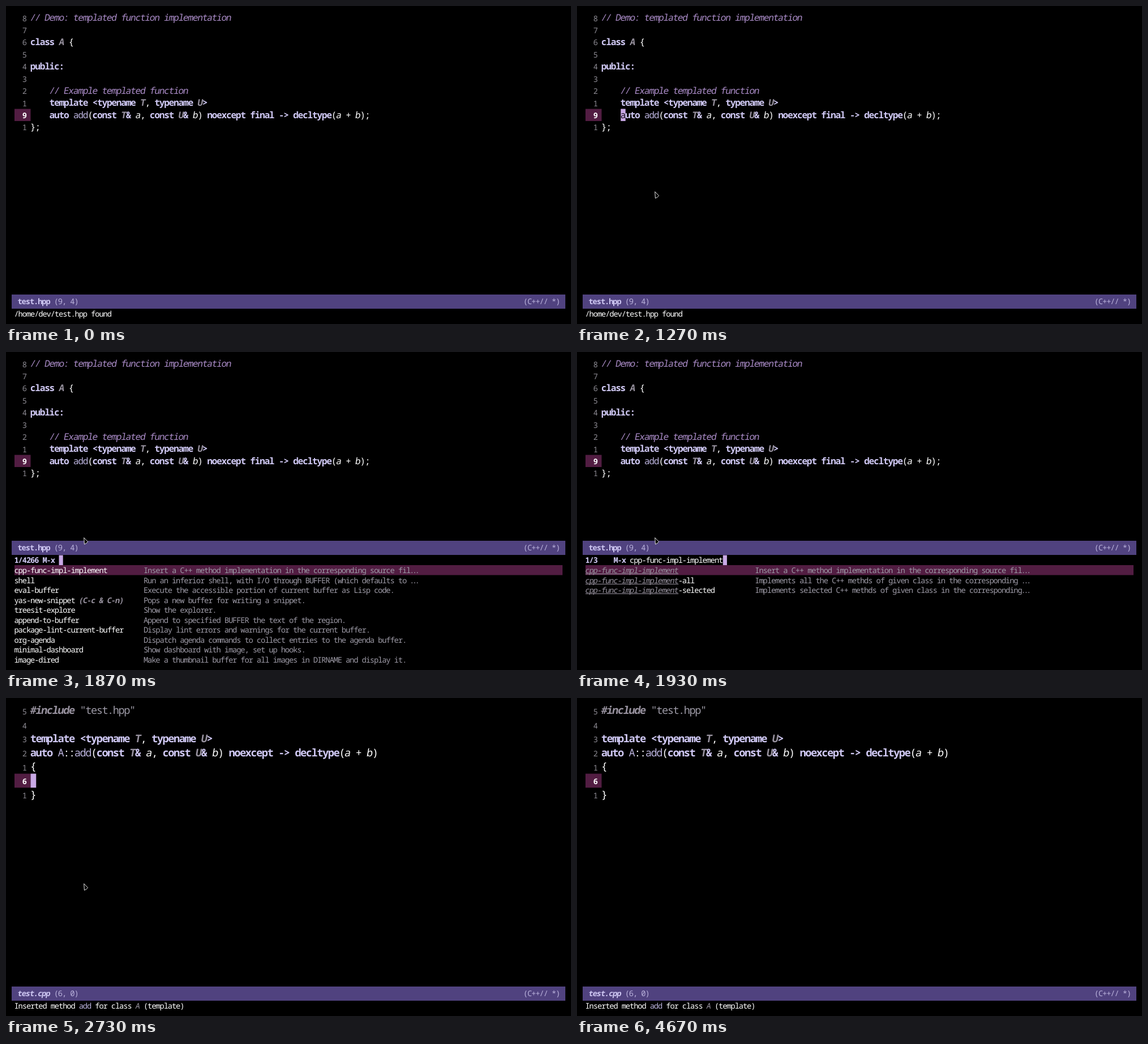
Animation of 998 by 561 pixels, one loop 4.94 s. Source, as an HTML page with a canvas:

```html
<!DOCTYPE html>
<html lang="en">
<head>
<meta charset="utf-8">
<style>
  html, body { margin: 0; width: 100%; height: 100%; overflow: hidden; background: #000; }
  canvas { display: block; }
</style>
</head>
<body>
<canvas id="stage" width="998" height="561"></canvas>
<script>
const ctx = document.getElementById("stage").getContext("2d");
const LOOP = 4940;
const SHOW = 70, PROMPT = 1330, COMPLETE = 1930, INSERT = 2730, HIDE = 4600;

const FACE = '"Noto Sans Mono", "DejaVu Sans Mono", monospace';
const SMALL = 7.14, LEFT = 15, CODE_X = 43.5, ROW = 17.55;
const SLANT = 0.17;
const BAR = "#50427f", MARK = "#521d42", CURSOR = "#c9a9e6";

// Styles: [weight, colour, slant]
const STYLES = {
  w: [400, "#ffffff", 0],
  k: [600, "#cfc8f3", 0],
  t: [600, "#98929f", SLANT],
  i: [400, "#98929f", SLANT],
  v: [400, "#ffffff", SLANT],
  c: [400, "#ab8cc8", SLANT],
  f: [400, "#bab2dc", 0],
  s: [400, "#9d9aa6", 0],
  n: [400, "#8c8a92", 0],
  b: [600, "#ffffff", 0],
  m: [600, "#cfc8f3", SLANT],
  d: [400, "#100818", 0]
};

// "~x" switches to style x for the text that follows.
const HEADER = [
  "~c// Demo: templated function implementation",
  "",
  "~kclass ~tA ~w{",
  "",
  "~kpublic:",
  "",
  "~c    // Example templated function",
  "~k    template <typename ~tT~w, ~ktypename ~tU~k>",
  "~k    auto ~fadd~w(~kconst ~tT~k& ~va~w, ~kconst ~tU~k& ~vb~w) ~knoexcept final -> decltype~w(~va ~w+ ~vb~w);",
  "~w};"
];
const SOURCE = [
  '~t#include ~s"test.hpp"',
  "",
  "~ktemplate <typename ~tT~w, ~ktypename ~tU~k>",
  "~kauto ~fA~w::~fadd~w(~kconst ~tT~k& ~va~w, ~kconst ~tU~k& ~vb~w) ~knoexcept -> decltype~w(~va ~w+ ~vb~w)",
  "~w{",
  "",
  "~w}"
];
const COMMANDS = [
  ["~wcpp-func-impl-implement", "Insert a C++ method implementation in the corresponding source fil…"],
  ["~wshell", "Run an inferior shell, with I/O through BUFFER (which defaults to …"],
  ["~weval-buffer", "Execute the accessible portion of current buffer as Lisp code."],
  ["~wyas-new-snippet ~t(C-c & C-n)", "Pops a new buffer for writing a snippet."],
  ["~wtreesit-explore", "Show the explorer."],
  ["~wappend-to-buffer", "Append to specified BUFFER the text of the region."],
  ["~wpackage-lint-current-buffer", "Display lint errors and warnings for the current buffer."],
  ["~worg-agenda", "Dispatch agenda commands to collect entries to the agenda buffer."],
  ["~wminimal-dashboard", "Show dashboard with image, set up hooks."],
  ["~wimage-dired", "Make a thumbnail buffer for all images in DIRNAME and display it."]
];
const TYPED = "cpp-func-impl-implement";
const MATCHES = [
  ["~i" + TYPED, "Insert a C++ method implementation in the corresponding source fil…"],
  ["~i" + TYPED + "~w-all", "Implements all the C++ methds of given class in the corresponding …"],
  ["~i" + TYPED + "~w-selected", "Implements selected C++ methds of given class in the corresponding…"]
];

function rect(x, y, w, h, color) {
  ctx.fillStyle = color;
  ctx.fillRect(x, y, w, h);
}

// Draws one character centred on x; slanted styles lean about mid-height.
function glyph(ch, x, y, slant, size) {
  ctx.setTransform(1, 0, -slant, 1, x - slant * size * 0.3, y);
  ctx.fillText(ch, 0, 0);
}

// Places marked-up text on a monospace grid; an ellipsis is two cells wide.
function write(markup, x, y, cell = SMALL) {
  const size = cell * 1.92;
  const parts = markup.split(/~(.)/);
  let col = 0;
  ctx.save();
  for (let p = 1; p < parts.length; p += 2) {
    const [weight, color, slant] = STYLES[parts[p]];
    ctx.font = `${weight} ${size}px ${FACE}`;
    ctx.fillStyle = color;
    for (const ch of parts[p + 1]) {
      if (ch === "…") {
        for (let dot = 1; dot < 6; dot += 2) glyph(".", x + (col + dot / 3) * cell, y, slant, size);
        col += 2;
      } else {
        if (ch !== " ") glyph(ch, x + (col + 0.5) * cell, y, slant && slant, size);
        col++;
      }
    }
  }
  ctx.restore();
}

function drawCode(lines, current, cell, pitch, drop) {
  lines.forEach((line, i) => {
    const top = 10 + i * pitch;
    const here = i === current;
    if (here) rect(LEFT, top, CODE_X - LEFT, pitch, MARK);
    const number = here ? i + 1 : Math.abs(i - current);
    write((here ? "~b" : "~n") + number, LEFT + 2 * SMALL, top + drop + 0.5);
    write(line, CODE_X, top + drop, cell);
  });
}

function drawBar(y, label) {
  rect(10, y, 978, 25, BAR);
  write(label, 21, y + 17);
  write("~f(C++// *)", 914.3, y + 17);
}

function drawPrompt(prompt, entries, descCol, cursorCol) {
  const first = 372.4;
  drawBar(333, "~ktest.hpp~f (9, 4)");
  write(prompt, LEFT, first);
  rect(LEFT + cursorCol * SMALL, 358.5, SMALL, ROW, CURSOR);
  rect(LEFT, 376, 968, ROW, MARK);
  entries.forEach(([name, desc], i) => {
    const y = first + (i + 1) * ROW;
    write(name, LEFT, y);
    write("~s" + desc, LEFT + descCol * SMALL, y);
    if (name.startsWith("~i")) rect(LEFT, Math.round(y) + 1, TYPED.length * SMALL, 1, STYLES.i[1]);
  });
}

function drawPointer() {
  ctx.beginPath();
  ctx.moveTo(137.7, 327.6);
  ctx.lineTo(144.6, 334.8);
  ctx.lineTo(141.8, 337.4);
  ctx.lineTo(138.4, 339.2);
  ctx.closePath();
  ctx.fillStyle = "#000";
  ctx.fill();
  ctx.strokeStyle = "#e4e4e4";
  ctx.lineWidth = 1;
  ctx.stroke();
}

function draw(t) {
  const active = t >= SHOW && t < HIDE;
  rect(0, 0, 998, 561, "#000");
  if (t < INSERT) {
    const cell = 8.44, pitch = 21.44;
    drawCode(HEADER, 8, cell, pitch, 16);
    if (t < PROMPT) {
      if (active) {
        const x = CODE_X + 4 * cell, y = 10 + 8 * pitch;
        rect(x, y, cell, pitch, CURSOR);
        write("~da", x, y + 16, cell);
      }
      drawBar(509, "~ktest.hpp~f (9, 4)");
      write("~w/home/dev/test.hpp found", LEFT, 548);
    } else if (t < COMPLETE) {
      drawPrompt("~k1/4266 M-x", COMMANDS, 32, 11);
    } else {
      drawPrompt("~k1/3    M-x ~w" + TYPED, MATCHES, 42, 34);
    }
  } else {
    const cell = 9.74, pitch = 24.7;
    drawCode(SOURCE, 5, cell, pitch, 18.4);
    if (active) rect(CODE_X, 10 + 5 * pitch, cell, pitch, CURSOR);
    drawBar(509, "~mtest.cpp~f (6, 0)");
    write("~wInserted method ~fadd~w for class ~iA~w (template)", LEFT, 548);
  }
  if (active) drawPointer();
}

ctx.textAlign = "center";
ctx.textBaseline = "alphabetic";
ctx.textRendering = "geometricPrecision";

const start = performance.now();
function tick() {
  draw((performance.now() - start) % LOOP);
  requestAnimationFrame(tick);
}
tick();
</script>
</body>
</html>
```
